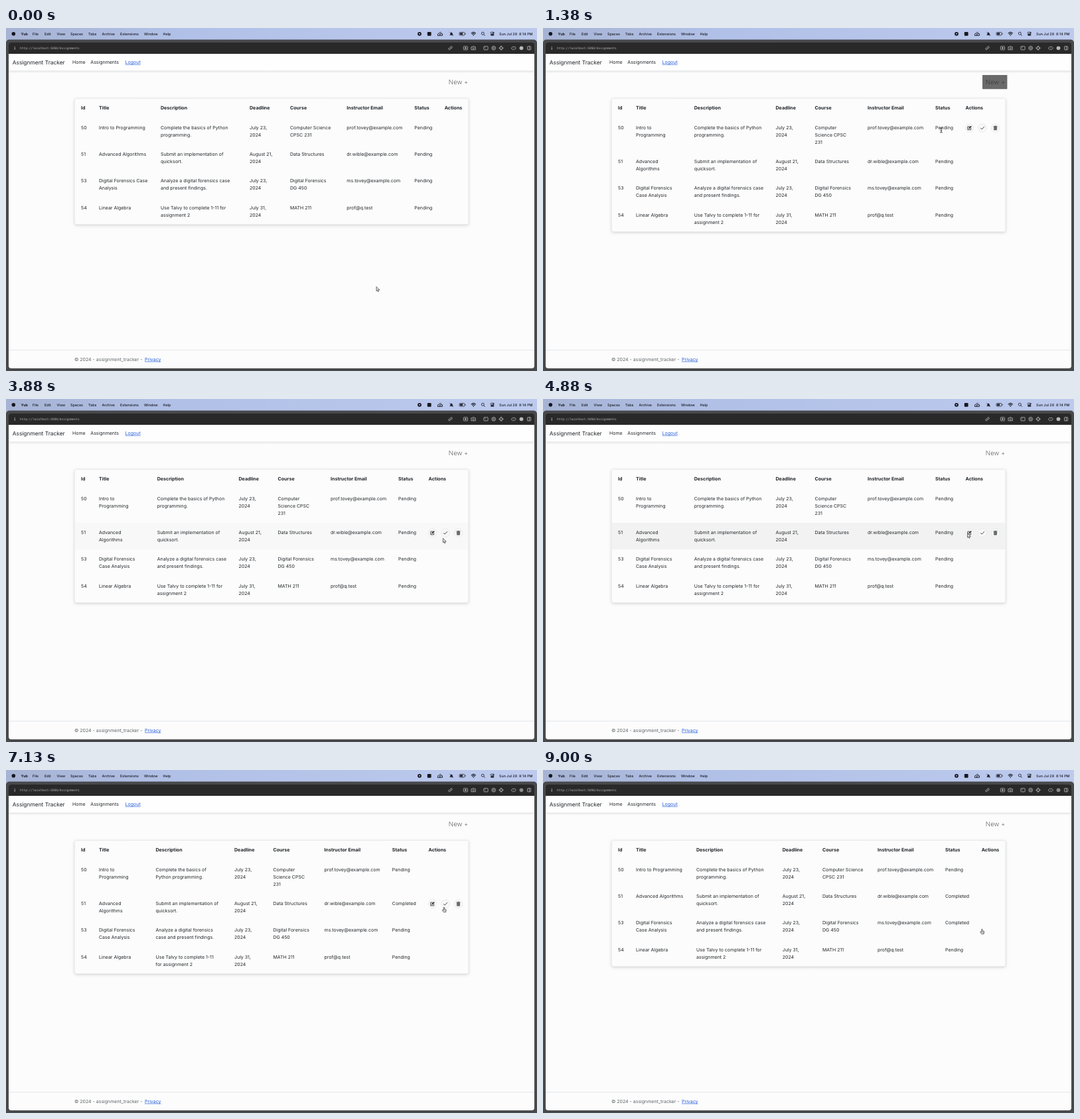
Write an HTML page with a canvas that moves like this. It is 800 px wide and 518 px high and loops after 9.13 s.

```html
<!DOCTYPE html>
<html lang="en">
<head>
<meta charset="utf-8">
<title>Assignment Tracker</title>
<style>
html, body { margin: 0; width: 100%; height: 100%; overflow: hidden; background: #48494b; }
canvas { display: block; width: 800px; height: 518px; }
</style>
</head>
<body>
<canvas id="stage" width="800" height="518"></canvas>
<script>
const ctx = document.getElementById('stage').getContext('2d');
const LOOP = 9130, STEP = 125, STEPS = 73;
const SANS = 'Inter, "Open Sans", sans-serif';
const MONO = '"DejaVu Sans Mono", monospace';
const INK = '#212529', LINK = '#2a60dc', PAGE = '#fcfcfc';
const BODY = 7, HEAD = 7.1;
const RELOAD_1 = 52, REHOVER = 57, RELOAD_2 = 69;

// Column positions: idle, row hovered, hovered after completion, idle after completion
const COLS = [
  [113, 140, 233, 367, 428, 513.3, 615.3, 660.7],
  [113, 140, 227.7, 350.5, 409.5, 489, 591, 636.5],
  [113, 140, 225.5, 344, 402.4, 479.5, 581.8, 636.5],
  [113, 140, 231, 360.7, 421, 504, 606, 660.7]
];
const HEADS = ['Id', 'Title', 'Description', 'Deadline', 'Course', 'Instructor Email', 'Status', 'Actions'];

// An array lists the wrapping for each column layout
const both = (idle, hover) => [idle, hover, hover, idle];
const narrow = (usual, tight) => [usual, usual, tight, usual];
const ROWS = [
  ['50', both('Intro to Programming', 'Intro to|Programming'),
    narrow('Complete the basics of Python|programming.', 'Complete the basics of|Python programming.'),
    'July 23,|2024', both('Computer Science|CPSC 231', 'Computer|Science CPSC|231'), 'prof.tovey@example.com'],
  ['51', both('Advanced Algorithms', 'Advanced|Algorithms'),
    'Submit an implementation of|quicksort.', 'August 21,|2024', 'Data Structures', 'dr.wible@example.com'],
  ['53', ['Digital Forensics Case|Analysis', 'Digital Forensics|Case Analysis',
     'Digital Forensics|Case Analysis', 'Digital Forensics|Case Analysis'],
    narrow('Analyze a digital forensics case|and present findings.', 'Analyze a digital forensics|case and present findings.'),
    'July 23,|2024', 'Digital Forensics|DG 450', 'ms.tovey@example.com'],
  ['54', 'Linear Algebra',
    narrow('Use Talvy to complete 1-11 for|assignment 2', 'Use Talvy to complete 1-11|for assignment 2'),
    'July 31,|2024', 'MATH 211', 'prof@q.test']
];

// Pointer path: step, x, y, shape (a arrow, i text, h hand)
const PATH = [
  [0, 558, 391, 'a'], [1, 563, 374, 'a'], [2, 655, 225, 'a'], [3, 674.5, 119, 'a'],
  [4, 679, 94, 'a'], [5, 680, 84, 'h'], [10, 677, 86, 'h'], [11, 600, 154, 'i'],
  [16, 604, 161, 'i'], [18, 612, 190, 'a'], [21, 628, 222, 'a'], [22, 635.5, 244.5, 'a'],
  [24, 640, 254, 'a'], [26, 650, 283, 'a'], [28, 655, 262, 'a'], [30, 657, 214, 'a'],
  [33, 661, 204, 'h'], [35, 680, 204, 'h'], [37, 661, 204, 'h'], [39, 639.5, 203, 'a'],
  [40, 641, 203, 'h'], [42, 642, 204, 'h'], [43, 642, 204, 'h'], [50, 660, 207, 'h'],
  [59, 660, 207, 'h'], [65, 661.5, 240, 'h'], [73, 661.5, 240, 'h']
];

const rowTops = hovered => hovered ? [135.8, 187, 227.3, 267.6, 308] : [135.8, 176.1, 216.4, 256.7, 297];

function pointer(k) {
  let i = 0;
  while (PATH[i + 1][0] <= k && i < PATH.length - 2) i++;
  const [k0, x0, y0, shape] = PATH[i], [k1, x1, y1] = PATH[i + 1];
  const f = (k - k0) / (k1 - k0);
  return { x: x0 + (x1 - x0) * f, y: y0 + (y1 - y0) * f, shape };
}

function buildStates() {
  const list = [];
  let last = { row: -1, fills: [0, 0, 0, 0], glow: 0 };
  for (let k = 0; k < STEPS; k++) {
    const p = pointer(k), tops = rowTops(last.row >= 0);
    const loading = (k >= RELOAD_1 && k < REHOVER) || k >= RELOAD_2;
    const row = loading ? -1 : [0, 1, 2, 3].findIndex(r => p.y >= tops[r] && p.y < tops[r + 1]);
    const fills = last.fills.map((v, r) => loading ? 0
      : r === row ? (last.row === row ? Math.min(1, v + 0.45) : v)
      : r === last.row ? v * 0.75 : Math.max(0, v - 0.4));
    const overNew = p.x > 662 && p.y > 71 && p.y < 92;
    const glow = overNew ? Math.min(1, last.glow + 0.5) : last.glow === 1 ? 0.79 : Math.max(0, last.glow - 0.5);
    last = { k, p, row, fills, glow };
    list.push(last);
  }
  return list;
}

function text(s, x, y, size, weight = 400, color = INK, family = SANS) {
  ctx.font = `${weight} ${size}px ${family}`;
  ctx.fillStyle = color;
  ctx.fillText(s, x, y);
}
function link(s, x, y, size) {
  text(s, x, y, size, 400, LINK);
  rect(x, y + 0.8, ctx.measureText(s).width, 0.7, LINK);
}
function rect(x, y, w, h, color) {
  ctx.fillStyle = color;
  ctx.fillRect(x, y, w, h);
}
function round(x, y, w, h, r, fill, stroke, line = 1) {
  ctx.beginPath();
  ctx.roundRect(x, y, w, h, r);
  if (fill) { ctx.fillStyle = fill; ctx.fill(); }
  if (stroke) { ctx.strokeStyle = stroke; ctx.lineWidth = line; ctx.stroke(); }
}
function disc(x, y, r, fill, stroke, line = 1) {
  round(x - r, y - r, 2 * r, 2 * r, r, fill, stroke, line);
}
function path(d, x, y, fill, stroke, line = 0.8) {
  const p = new Path2D(d);
  ctx.save();
  ctx.translate(x, y);
  ctx.lineJoin = ctx.lineCap = 'round';
  if (fill) { ctx.fillStyle = fill; ctx.fill(p); }
  if (stroke) { ctx.strokeStyle = stroke; ctx.lineWidth = line; ctx.stroke(p); }
  ctx.restore();
}

function menuBar() {
  const g = ctx.createLinearGradient(0, 0, 800, 0);
  g.addColorStop(0, '#a6b3d4');
  g.addColorStop(0.32, '#b1c0e7');
  g.addColorStop(1, '#bdcaee');
  rect(0, 0, 800, 24, g);
  const c = '#16181f';
  disc(11.3, 8.7, 2.8, c);
  text('Yub', 22.5, 10.6, 5.35, 700, c);
  const items = { File: 40, Edit: 58, View: 76.5, Spaces: 97, Tabs: 124, Archive: 144.5, Extensions: 172, Window: 208, Help: 236.5 };
  for (const name in items) text(name, items[name], 10.6, 5.35, 500, c);
  text('Sun Jul 28', 743, 10.6, 5.35, 500, c);
  text('8:14 PM', 773, 10.6, 5.35, 500, c);
  disc(623, 8.8, 2.9, c);
  disc(623, 8.8, 1, '#b9c6ea');
  round(634.8, 6, 5.8, 5.8, 1, c);
  path('M-3.5 2 Q-4 -1 -1.5 -1 Q0 -4 2 -1.5 M0 2.5 H3.5 V0 H0Z M-3.5 2.5 H0', 654, 8.8, null, c, 0.9);
  path('M-2 1.5 Q-1 0 -1 -1 Q0 -3 1.2 -1 L2 1.7Z M-2.5 -2.7 L2.7 2.8', 671, 8.8, c, c, 0.6);
  round(683, 6.5, 8, 4.6, 1.2, null, c, 0.7);
  rect(684, 7.5, 4.2, 2.6, c);
  rect(691.7, 7.9, 0.8, 1.8, c);
  path('M-3.2 -1 Q0 -3.8 3.2 -1 M-1.9 .5 Q0 -1.3 1.9 .5 M-.4 2 L0 2.4 L.4 2', 704.3, 8.8, null, c, 1.1);
  disc(718.3, 8.2, 2, null, c, 0.8);
  path('M0 0 L1.6 1.6', 719.8, 9.7, null, c, 0.9);
  round(730, 6.2, 5.4, 2.2, 1.1, null, c, 0.7);
  round(730, 9.3, 5.4, 2.2, 1.1, c);
  disc(734.2, 7.3, 0.9, c);
}

function addressBar(k) {
  round(0, 17.5, 800, 510, [5, 5, 0, 0], '#48494b');
  round(4, 22, 792, 22, [4, 4, 0, 0], '#29292a');
  const c = '#bdbdbd';
  rect(12.7, 28, 1, 1, c);
  rect(12.7, 29.7, 1, 3, c);
  text('http://localhost:5050/Assignments', 21, 32.1, 4.53, 400, '#bcbcbc', MONO);
  path('M-.4 .8 L1 -.6 M-.6 -1 L.7 -2.3 Q2.2 -3 2.7 -1.8 Q3 -.8 1.6 .6 M.6 1 L-.7 2.3 Q-2.2 3 -2.7 1.8 Q-3 .8 -1.6 -.6', 669.5, 30.3, null, c);
  round(689.3, 27.7, 6.2, 5.2, 0.8, null, c, 0.8);
  disc(692.4, 30.3, 1.3, c);
  path('M-3 -1.7 H-1.6 L-1 -2.7 H1 L1.6 -1.7 H3 V2.5 H-3Z', 704.3, 30.3, null, c);
  disc(704.3, 30.6, 1.1, null, c, 0.7);
  round(719.9, 27.7, 6.2, 5.2, 0.8, null, c, 0.8);
  path('M-1.7 -1 L-.6 0', 723, 30, null, c, 0.7);
  disc(734.7, 30.3, 2.9, null, c, 0.8);
  disc(734.7, 30.3, 1.3, null, c, 0.8);
  disc(746, 30.3, 2.3, null, c, 0.8);
  path('M0 -3.3 V-1.5 M0 3.3 V1.5 M-3.3 0 H-1.5 M3.3 0 H1.5', 746, 30.3, null, c);
  path('M-3.6 0 L-1.2 -2.3 L0 -1.2 L1.2 -2.3 L3.6 0 L1.2 2.3 L0 1.2 L-1.2 2.3Z', 765, 30.3, null, c);
  disc(776.5, 30.3, 2.9, k >= RELOAD_1 ? '#8a8a8a' : '#b9b9b9');
  round(785.5, 27.7, 5.2, 5.2, 0.7, null, c, 0.8);
  rect(787.9, 27.7, 0.8, 5.2, c);
}

function pageFrame(glow) {
  round(4, 39, 792, 475, [0, 0, 4, 4], PAGE);
  const g = ctx.createLinearGradient(0, 65, 0, 68.5);
  g.addColorStop(0, '#e8e8e8');
  g.addColorStop(1, PAGE);
  rect(4, 65, 792, 3.5, g);
  rect(4, 39, 792, 25.5, '#fefefe');
  rect(4, 64.5, 792, 0.6, '#dfe2e5');
  text('Assignment Tracker', 9.7, 55, 8.4);
  text('Home', 100, 54.3, BODY);
  text('Assignments', 127.3, 54.3, BODY);
  link('Logout', 179.6, 54, BODY);
  if (glow) {
    ctx.globalAlpha = glow;
    round(662, 71, 37.4, 21.2, 0.6, '#444');
    ctx.globalAlpha = 1;
  }
  text('New +', 666.8, 85.4, 9.6, 250);
  rect(4, 486, 792, 0.8, '#dfe2e5');
  text('© 2024 - assignment_tracker -', 102.9, 502.8, BODY, 400, '#5e6468');
  link('Privacy', 209, 502.8, BODY);
}

function actionButtons(y) {
  for (const x of [642.5, 662, 681.6]) disc(x, y, 6.3, '#f8f8f8', '#e4e4e4', 0.7);
  path('M.5 -2.2 H-2.6 V2.7 H2.3 V.4', 642.4, y, null, INK, 0.8);
  path('M-.9 1 L-.6 -.4 L2.2 -3 L3.2 -2 L.4 .7Z', 642.4, y, INK, INK, 0.3);
  path('M-2.6 .2 L-.8 2 L2.7 -1.9', 662, y, null, INK, 0.8);
  path('M-2.1 -1.5 H2.1 L1.9 3 H-1.9Z', 681.6, y, '#54585c', INK, 0.4);
  path('M-2.6 -2.3 H2.6 M-.7 -2.9 H.7', 681.6, y, null, INK, 0.7);
  path('M-.8 -.4 V2.1 M.8 -.4 V2.1', 681.6, y, null, '#bbb', 0.4);
}

function table({ k, row, fills }) {
  const hovered = row >= 0, done = k >= RELOAD_1;
  const layout = done ? (hovered ? 2 : 3) : (hovered ? 1 : 0);
  const cols = COLS[layout], tops = rowTops(hovered), bottom = tops[4];
  ctx.save();
  ctx.shadowColor = 'rgba(0,0,0,.17)';
  ctx.shadowBlur = 4;
  ctx.shadowOffsetY = 1.2;
  round(103.3, 106.3, 593.6, bottom - 106.6, 3, PAGE);
  ctx.restore();
  round(103.3, 106.3, 593.6, bottom - 106.6, 3, PAGE, '#dcdfe2', 0.6);
  HEADS.forEach((h, i) => text(h, cols[i], 123.4, HEAD, 700));
  ROWS.forEach((cells, r) => {
    const top = tops[r];
    if (fills[r] > 0) {
      ctx.globalAlpha = fills[r];
      round(103.7, top, 592.8, tops[r + 1] - top - (r === 3 ? 0.7 : 0), r === 3 ? [0, 0, 3, 3] : 0, '#f2f2f2');
      ctx.globalAlpha = 1;
    }
    const finished = (r === 1 && done) || (r === 2 && k >= RELOAD_2);
    [...cells, finished ? 'Completed' : 'Pending'].forEach((cell, i) => {
      const value = Array.isArray(cell) ? cell[layout] : cell;
      value.split('|').forEach((line, n) => text(line, cols[i], top + 17 + n * 10.9, BODY));
    });
    if (r === row) actionButtons(top + 15.2);
  });
}

function drawPointer({ x, y, shape }) {
  if (shape === 'a') {
    path('M0 0 V6.3 L1.5 5 L2.5 7.3 L3.6 6.8 L2.6 4.6 H4.5Z', x, y, '#dcdcdc', '#303030', 0.65);
  } else if (shape === 'i') {
    path('M-1.5 -3.2 Q0 -3.2 0 -2.2 Q0 -3.2 1.5 -3.2 M0 -2.2 V3 M-1.5 4 Q0 4 0 3 Q0 4 1.5 4 M-.8 .9 H.8', x, y, null, '#222', 0.8);
  } else {
    path('M-.7 .6 Q0 -.4 .6 .6 V3 L2.6 3.4 Q3.3 3.6 3.2 4.4 L2.6 7.6 H-.8 L-2.7 4.9 Q-2.7 3.7 -1.6 4.2 L-.7 4.9Z', x, y, '#eee', '#333', 0.7);
    path('M.9 4.4 V6 M2 4.5 V6', x, y, null, '#555', 0.4);
  }
}

const states = buildStates();
let shown = -1;

function stepAt(t) {
  const k = Math.floor(t / STEP);
  return Math.min(STEPS - 1, t < Math.ceil(k * STEP / 10) * 10 ? k - 1 : k);
}
function draw(k) {
  const s = states[k];
  ctx.textRendering = 'geometricPrecision';
  menuBar();
  addressBar(k);
  pageFrame(s.glow);
  table(s);
  drawPointer(s.p);
}

const start = performance.now();
function tick() {
  const k = stepAt((performance.now() - start) % LOOP);
  if (k !== shown) draw(shown = k);
  requestAnimationFrame(tick);
}
tick();
</script>
</body>
</html>
```
